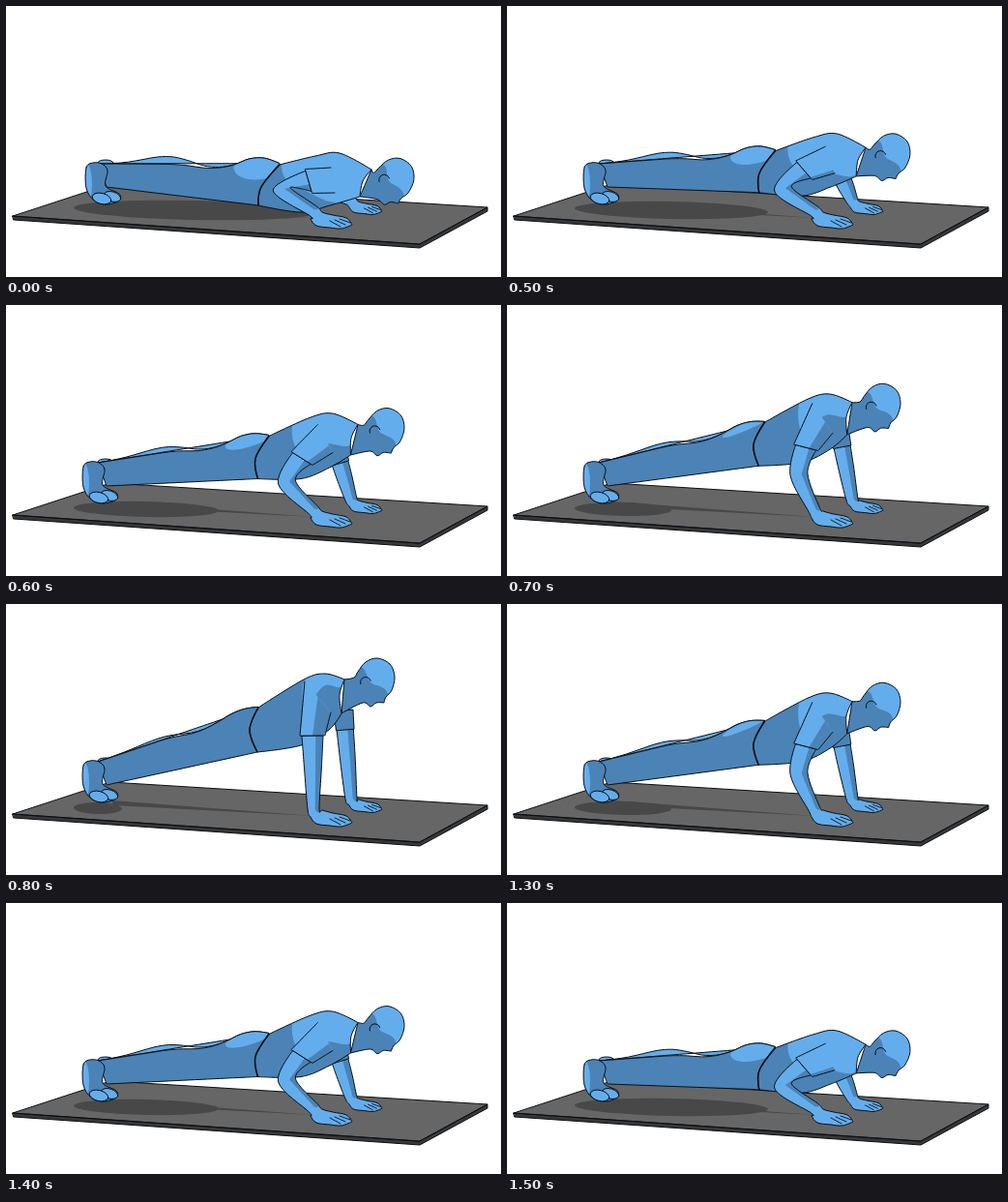
These frames come from a looping animation (512 px wide and 280 px high, 1600 ms). An HTML page with a canvas:

```html
<!DOCTYPE html>
<html lang="en">
<head>
<meta charset="utf-8">
<title>Push-up</title>
<style>
html, body { margin: 0; width: 512px; height: 280px; overflow: hidden; background: #fff; }
canvas { display: block; }
</style>
</head>
<body>
<canvas id="stage" width="512" height="280"></canvas>
<script>
const ctx = document.getElementById('stage').getContext('2d');
const LIGHT = '#64adec', DARK = '#4b83b7', INK = '#0b0f14';
const MAT = '#666', SHADOW = '#484848', MAT_SIDE = '#383838';

const clamp = (v, lo, hi) => Math.max(lo, Math.min(hi, v));
const mix = (a, b, u) => [a[0] + (b[0] - a[0]) * u, a[1] + (b[1] - a[1]) * u];
const sharp = p => [p[0], p[1], true];
const bell = (u, center, width) => Math.exp(-(((u - center) / width) ** 2));

// Smooth closed curve through the points, with no tangent at sharp ones.
function curve(pts, closed = true) {
  const path = new Path2D(), n = pts.length;
  const at = i => closed ? pts[(i + n) % n] : pts[clamp(i, 0, n - 1)];
  const tangent = i => at(i)[2] ? [0, 0]
    : [(at(i + 1)[0] - at(i - 1)[0]) / 6, (at(i + 1)[1] - at(i - 1)[1]) / 6];
  path.moveTo(pts[0][0], pts[0][1]);
  for (let i = 0; i < (closed ? n : n - 1); i++) {
    const p = at(i), q = at(i + 1), s = tangent(i), t = tangent(i + 1);
    path.bezierCurveTo(p[0] + s[0], p[1] + s[1], q[0] - t[0], q[1] - t[1], q[0], q[1]);
  }
  return path;
}

function oval(x, y, rx, ry, turn = 0) {
  const path = new Path2D();
  path.ellipse(x, y, rx, ry, turn, 0, 2 * Math.PI);
  return path;
}

function fill(path, color) {
  ctx.fillStyle = color;
  ctx.fill(path);
}

function ink(path, width = 1) {
  ctx.strokeStyle = INK;
  ctx.lineWidth = width;
  ctx.stroke(path);
}

function part(path, base, tone, toneColor, outline = path) {
  fill(path, base);
  if (tone) {
    ctx.save();
    ctx.clip(path);
    fill(tone, toneColor);
    ctx.restore();
  }
  ink(outline);
}

// Line from a to b, raised or lowered along its length.
function edge(a, b, offset) {
  return Array.from({ length: 13 }, (_, i) => {
    const [x, y] = mix(a, b, i / 12);
    return [x, y + offset(i / 12), i % 12 === 0];
  });
}

// Both sides of a bent limb.
function limb(joints, widths) {
  const side = sign => joints.map(([x, y], i) => {
    const p = joints[Math.max(0, i - 1)], q = joints[Math.min(joints.length - 1, i + 1)];
    const dx = q[0] - p[0], dy = q[1] - p[1], k = sign * widths[i] / Math.hypot(dx, dy);
    return [x - dy * k, y + dx * k, i === 0];
  });
  return { outer: side(1), inner: side(-1) };
}

// Two-bone joint that bends to the left; straight when out of reach.
function bend(a, b, upper, lower) {
  const dx = b[0] - a[0], dy = b[1] - a[1], d = Math.hypot(dx, dy);
  if (d >= upper + lower) return mix(a, b, upper / (upper + lower));
  const along = (upper * upper - lower * lower + d * d) / (2 * d);
  const out = Math.sqrt(upper * upper - along * along);
  return [a[0] + (dx * along - dy * out) / d, a[1] + (dy * along + dx * out) / d];
}

const HAND = [[-3, 8], [3, 15], [17, 17], [29, 18], [40, 14, true], [34, 7], [20, 4], [9, 1]];

function drawArm(joints, widths, scale) {
  const { outer, inner } = limb(joints, widths);
  const wrist = joints[joints.length - 1];
  const place = (x, y) => [wrist[0] + x * scale, wrist[1] + y * scale];
  const hand = HAND.map(([x, y, corner]) => [...place(x, y), corner]);
  const core = inner.map((p, i) => sharp(mix(p, outer[i], 0.35)));
  const back = inner.slice().reverse();
  part(curve([...outer, ...hand, ...back]), LIGHT, curve([...core, ...back]), DARK);
  for (let i = 0; i < 3; i++) {
    ink(curve([place(17 + 5 * i, 10 - i), place(28 + 5 * i, 16 - 2 * i)], false), 0.9);
  }
}

const matTop = new Path2D('M7 217L108 184L498 208L428 246Z');
const matSide = new Path2D('M7 217L428 246L498 208V212L428 250L8 221Z');

function drawMat(h) {
  fill(matTop, MAT);
  ctx.save();
  ctx.clip(matTop);
  const reach = 125 - 100 * h;
  fill(oval(70 + reach, 211, reach, 10 - 4 * h, 0.02), SHADOW);
  fill(new Path2D('M110 203L318 219L110 208Z'), SHADOW);
  ctx.restore();
  fill(matSide, MAT_SIDE);
  ink(matTop);
  ink(matSide);
}

function drawLegs(h, waist) {
  const [hip, , belly] = waist;
  const ankle = [95, 163], sole = [104, 187];
  const back = u => 4 * bell(u, 0.62, 0.12) - (8 - 4 * h) * bell(u, 0.88, 0.09);
  const calf = u => back(u) - (8 - 5 * h) * bell(u, 0.38, 0.18);
  part(oval(103, 162, 8, 3), LIGHT);
  part(curve(edge(ankle, hip, calf)), LIGHT);
  const seat = mix(ankle, hip, 0.9);
  part(curve([...edge(ankle, hip, back), waist[1], ...edge(belly, sole, () => 0)]), DARK,
    oval(seat[0], seat[1] - 1, 29, 16 * (1 - h), -0.2 - 0.3 * h), LIGHT);
}

function drawFoot(h) {
  ctx.save();
  ctx.translate(Math.max(0, 3 - 12 * h), 0);
  const foot = [[80, 167], [87, 162], [96, 163], [102, 170], [100, 186], [114, 194],
    [114, 201], [101, 205], [88, 201], [80, 188]];
  part(curve(foot), DARK, oval(81, 184, 5, 20), LIGHT);
  part(oval(107, 197, 9, 5, 0.3), LIGHT);
  part(oval(96, 199, 10, 5.5, 0.25), LIGHT);
  ctx.restore();
}

function drawHead(h, nape, throat) {
  const skull = [[-19, -6], [-11, -16], [1, -20], [14, -14], [19, -1], [16, 13], [10, 20],
    [8, 26, true], [0, 26], [-6, 30], [-14, 26], [-20, 16]];
  const face = [[-24, -12], [-13, -9], [-6, 5], [6, 10], [12, 17], [14, 36], [-30, 36]];
  const center = mix([403, 177], [383, 76], h);
  const turn = 0.2 * (1 - h);
  const place = ([x, y, corner]) => [
    center[0] + x * Math.cos(turn) - y * Math.sin(turn),
    center[1] + x * Math.sin(turn) + y * Math.cos(turn), corner];
  const outline = [sharp(nape), place([-23, 0]), ...skull.slice(0, -1).map(place), sharp(throat)];
  part(curve(outline), LIGHT, curve([nape, ...face.map(place), throat]), DARK);
  const ear = new Path2D(), [x, y] = place([-11, 5]);
  ear.arc(x, y, 5.5, 0.9 * Math.PI, 1.9 * Math.PI);
  ink(ear);
}

// h is the height of the push: 0 near the floor, 1 with straight arms.
function drawPose(h) {
  const go = (x0, y0, x1, y1) => mix([x0, y0], [x1, y1], h);
  const sway = 4 * h * (1 - h);
  const waist = [sharp(go(283, 164, 261, 107)), go(264, 187, 252, 130), sharp(go(261, 206, 260, 153))];
  const nape = go(378, 169, 350, 78), throat = go(366, 197, 347, 113);
  const chest = go(335, 206, 334, 130);

  ctx.fillStyle = '#fff';
  ctx.fillRect(0, 0, 512, 280);
  drawMat(h);

  const farTop = go(352, 196, 349, 110);
  farTop[0] -= 8 * sway;
  const far = limb([farTop, [357, 201]], [10, 7]);
  drawArm([farTop, mix(farTop, [357, 201], 0.5), [357, 201]], [9, 8, 6], 0.8);
  const hem = i => mix(far[i][0], far[i][1], 0.22);
  part(curve([far.outer[0], hem('outer'), hem('inner'), far.inner[0]].map(sharp)), DARK);

  drawHead(h, nape, throat);
  drawLegs(h, waist);
  drawFoot(h);

  const torso = [waist[0], go(320, 155, 308, 78), go(345, 152, 330, 72), sharp(nape),
    go(369, 181, 345, 94), sharp(throat), chest, go(305, 213, 305, 146), waist[2], waist[1]];
  const lit = [go(290, 158, 309, 78), go(345, 148, 332, 68), go(382, 168, 353, 78),
    go(366, 204, 345, 86), go(335, 202, 330, 84), go(312, 192, 316, 100), go(290, 180, 308, 112)];
  part(curve(torso), DARK, curve(lit), LIGHT);
  ink(curve(waist, false), 1.5);

  const cuff = go(313, 181, 317, 136), wrist = [318, 212];
  cuff[0] -= 9 * sway;
  const joints = [cuff, bend(cuff, wrist, 29, 40), wrist];
  drawArm(joints, [11, 9, 6], 1);

  const { outer, inner } = limb(joints, [13, 9, 6]);
  const top = go(336, 167, 309, 80), fold = go(340, 193, 336, 112);
  const sleeve = [top, outer[0], inner[0], fold].map(sharp);
  const shade = [mix(inner[0], outer[0], h / 2), inner[0], fold, mix(fold, top, h / 2)].map(sharp);
  part(curve(sleeve), LIGHT, curve(shade), DARK, curve(sleeve, false));
}

// Four steps up, a hold, then the same four steps down.
const LOOP = 1600, STEP = 100, LEVELS = 4;
function heightAt(t) {
  const tick = Math.floor(t / STEP);
  return (clamp(tick - 4, 0, LEVELS) - clamp(tick - 12, 0, LEVELS)) / LEVELS;
}

ctx.lineJoin = ctx.lineCap = 'round';
const start = performance.now();
let shown;

function frame() {
  const h = heightAt((performance.now() - start) % LOOP);
  if (h !== shown) drawPose(shown = h);
  requestAnimationFrame(frame);
}
frame();
</script>
</body>
</html>
```
